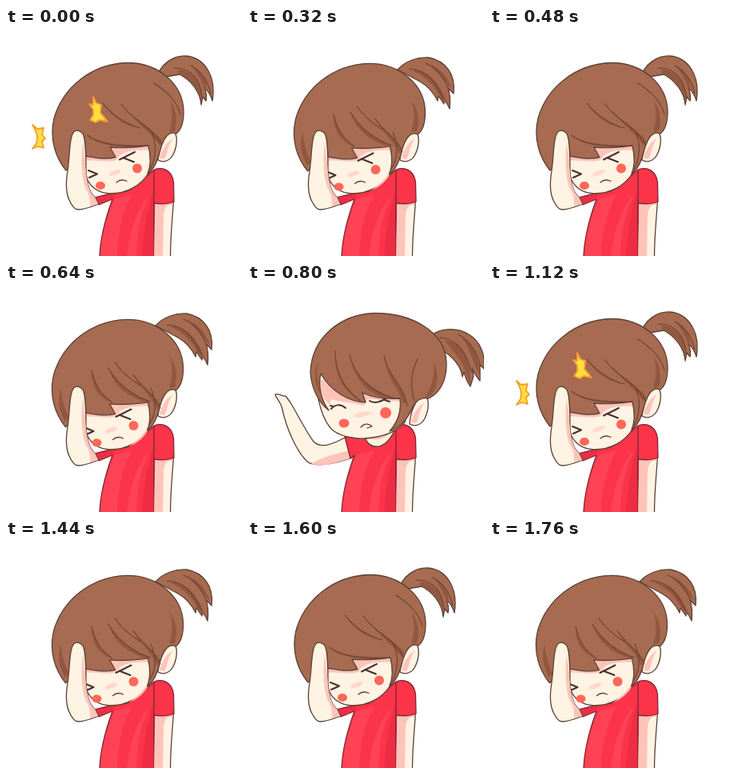
These frames come from a looping animation (295 by 285 pixels, 1920 ms). An HTML page:

```html
<!DOCTYPE html>
<html lang="en">
<head>
<meta charset="utf-8">
<title>Facepalm</title>
<style>
  html, body { margin: 0; width: 100%; height: 100%; overflow: hidden; background: #fff; }
  svg { display: block; width: 295px; height: 285px; }
  path { fill: none; stroke: #5b4036; stroke-width: 1.3; stroke-linejoin: round; stroke-linecap: round; }
  .hair { fill: #a66b50; }
  .dark { fill: #925741; stroke: none; }
  .strand { stroke: #6d4232; stroke-width: 1.1; }
  .skin { fill: #fff3e3; }
  .shade { fill: #ffc4b9; stroke: none; }
  .shirt { fill: #fb3449; stroke: #7b2830; }
  .light { fill: #ff4256; stroke: none; }
  .fold { fill: #ee2d44; stroke: none; }
  .eye { stroke: #49302b; stroke-width: 2; }
  .cheek { fill: #ff6759; }
  .blush { fill: #ffd8c9; }
  .spark { fill: #ffdf40; stroke: #f99b32; stroke-width: 1.8; }
</style>
</head>
<body>
<svg viewBox="0 0 295 285">
  <defs>
    <g id="arm">
      <path class="skin" d="M185 213L184 286H205.500C205.500 260 208 239 209.500 215Z"/>
      <path class="shade" d="M185.500 214L208.500 216L208 221C202 220 198 224 197 234L196 285H185Z"/>
    </g>
    <g id="sleeve">
      <path class="shirt" d="M185 177C199 172 208 181 209.500 193L210 217C201 221 192 220 185 219Z"/>
    </g>
    <g id="folds">
      <path class="light" d="M136 214L158 208C145 230 140 258 139 285H118C119 260 126 234 136 214ZM176 212C162 232 154 257 151 285H163C164 257 168 232 179 212Z"/>
      <path class="fold" d="M184 204C176 230 172 256 170 285H184Z"/>
      <path class="strand" style="stroke:#a5253a" d="M186 194L184.500 285"/>
    </g>
    <g id="ear">
      <path class="skin" d="M190 165C191 150 197 134 207 130C215 128 215 146 209 158C205 166 197 169 190 165Z"/>
      <path class="shade" d="M192 163C195 151 200 143 209 138C201 148 203 156 198 164Z"/>
    </g>
    <g id="palmBody">
      <use href="#arm"/>
      <path class="shirt" d="M111 212C126 208 139 205 151 204C163 198 173 187 184 178L191 178L185 215L184 286H117C118 260 125 236 133 214L116 221Z"/>
      <path class="fold" d="M112 212C121 211 128 208 136 206L133 213L116 220Z"/>
      <use href="#folds"/><use href="#sleeve"/>
    </g>
    <g id="palmFace">
      <use href="#ear"/>
      <path class="skin" d="M92 140L101 188C106 200 115 206 130 207C151 207 169 197 179 180L187 145Z"/>
      <path class="shade" d="M98 156V166C112 164 126 169 138 165C142 155 160 151 180 153L183 146L130 146Z"/>
    </g>
    <path id="palmHair" class="hair" d="M75 178C62 162 54 139 60 113C71 74 107 45 151 43.500C190 43 222 70 222 105C222 119 218 128 213 132C203 128 197 138 193 152C190 165 186 176 177 182C181 173 181 160 178 147C163 149 147 151 130 149L137 161.500C124 165 111 162 98 160Z"/>
    <g id="palmArm">
      <path class="skin" d="M86 129C79 133 80 159 77 179C74 197 75 208 80 217C83 223 86 227 90 227C99 227 108 223 116 220L111 211C104 206 101 192 100 180C100 161 100 139 96 132C93 129 89 127 86 129Z"/>
      <path class="shade" d="M96 143C93 164 95 190 100 201C104 208 106 214 105 223L115 220L111 211C104 206 101 192 100 180Z"/>
    </g>
    <g id="wince">
      <path class="eye" d="M161 155L142 164.500M146 162L160 167.500M103 178L114 182.500L104 187"/>
      <path d="M138 193C142 189.500 147 189.500 151 191.500" stroke-width="1.5"/>
      <ellipse class="blush" cx="136" cy="181" rx="8" ry="3" transform="rotate(-20 136 181)"/>
      <ellipse class="cheek" cx="118" cy="197" rx="6" ry="5"/>
      <circle class="cheek" cx="164" cy="175.500" r="6"/>
    </g>
  </defs>

  <g id="lean">
    <path class="hair" d="M188 63C193 45 209 34 225 35C249 37 263 61 258 91C256 84 253 79 248 75C251 82 251 87 250 91L246 86L244 96C243 80 231 65 217 58Z"/>
    <path class="dark" d="M215 52C234 54 245 66 245 92C241 75 230 63 215 56ZM232 47C246 55 252 65 250 81C246 68 240 58 232 47Z"/>
    <path class="strand" d="M210 50C232 50 243 64 245 86M231 47C244 54 252 65 256 82"/>
    <use href="#palmBody"/><use href="#palmFace"/><use href="#wince"/><use href="#palmHair"/>
    <path class="dark" d="M121 94C134 108 149 119 168 125C153 124 134 114 121 94ZM144 94C156 112 176 119 195 140L193 148C184 133 163 119 144 94ZM102 133C117 145 145 147 176 146C150 151 121 148 102 133ZM205 91C213 102 215 115 211 129L204 130C208 117 209 105 205 91Z"/>
    <path class="strand" d="M121 94C133 109 148 120 168 125M144 95C158 116 181 122 194 145M102 134C117 147 145 149 176 147M182 130C188 144 188 161 180 177M185 69C202 80 213 91 218 108"/>
    <use href="#palmArm"/>
  </g>

  <g id="bob">
    <path class="hair" d="M187 52C197 41 212 36 226 37C247 41 260 58 257 82L250 75C253 83 253 92 252 101L245 87L245 95L238 85L237 91C231 79 224 72 215 67Z"/>
    <path class="dark" d="M207 52C229 55 240 70 250 96C241 90 236 78 229 70C222 62 214 57 207 54ZM226 45C240 50 249 60 255 76C245 67 238 56 226 45Z"/>
    <path class="strand" d="M201 51C225 52 235 69 244 88M222 44C238 51 244 60 251 77"/>
    <use href="#palmBody"/><use href="#palmFace"/>
    <path class="shade" d="M154 203C166 198 173 191 178 182L179 177C173 187 164 196 154 203Z"/>
    <use href="#wince" transform="translate(-4.500 1.500)"/>
    <use href="#palmHair" transform="translate(-.500 .800)"/>
    <path class="dark" d="M107 108C110 125 118 138 133 149C116 142 106 128 107 108ZM128 105C138 124 157 137 180 147L172 147C151 140 134 126 128 105ZM159 113C168 130 186 138 193 154L189 157C182 140 168 132 159 113ZM205 91C213 102 215 115 211 129L204 130C208 117 209 105 205 91ZM68 130C70 145 74 158 79 168L74 172C67 160 64 146 68 130Z"/>
    <path class="strand" d="M136 98C145 111 155 119 168 127M128 105C138 124 158 139 180 147M159 113C170 131 187 138 193 155M107 108C111 127 119 139 133 148M181 130C188 146 188 163 179 176"/>
    <use href="#palmArm"/>
  </g>

  <g id="raise">
    <path class="hair" d="M231 63C242 55 262 54 276 63C290 71 297 88 295 106L290 101L290 121C285 115 282 110 280 105L282 115L278 128C273 122 272 117 270 110L268 116C266 102 256 91 242 82Z"/>
    <path class="dark" d="M246 70C265 74 278 88 278 124C273 117 272 105 265 95C258 85 251 78 246 70ZM266 65C281 75 288 89 289 112C282 102 278 80 266 65Z"/>
    <path class="strand" d="M240 67C262 68 274 88 279 110M263 63C278 72 287 87 290 103"/>
    <use href="#arm"/>
    <path class="skin" d="M123 191C105 201 91 206 82 197C73 185 63 165 53 148L47 140C43 141 38 136 34 138C35 143 41 147 43 157C48 180 60 208 73 221C82 230 104 226 131 217Z"/>
    <path class="shade" d="M79 225C92 216 108 213 127 208L131 217C106 225 92 229 79 225Z"/>
    <path class="shirt" d="M121 191C145 193 168 187 185 177L191 178L185 215L184 286H117C118 260 125 236 133 214L128 218Z"/>
    <use href="#folds"/><use href="#sleeve"/>
    <path class="skin" d="M145 188C148 201 155 204 164 203C174 200 181 190 186 176Z"/>
    <path class="shade" d="M147 191C160 199 175 193 185 178L184 174L150 186Z"/>
    <use href="#ear" transform="translate(12 10)"/>
    <path class="skin" d="M85 112C85 145 94 172 106 183C118 192 140 195 155 192C172 190 186 184 196 173L204 140L160 112Z"/>
    <path class="shade" d="M88 120C90 134 95 145 102 151L104 144C118 148 131 148 145 152L149 144C162 144 176 146 190 147L194 140L151 120Z"/>
    <path class="eye" d="M104 156C109 150 116 150 122 155M106 153L103 152M152 146C158 150 168 147 173 142M171 145L177 147"/>
    <path d="M141 179C144 175 150 173 155 178L149 180" stroke-width="1.5"/>
    <ellipse class="blush" cx="143" cy="163" rx="11" ry="3" transform="rotate(-12 143 163)"/>
    <ellipse class="cheek" cx="120" cy="174" rx="6.500" ry="5.500"/>
    <circle class="cheek" cx="172" cy="161" r="7"/>
    <path class="hair" d="M101 158C88 148 79 130 78 110C80 66 116 38 158 36.500C204 36 246 59 248 97C249 118 241 136 226 143C216 141 210 145 206 154C200 168 191 179 177 184C186 174 192 160 190 143C176 144 158 143 143 136L147 148C126 147 104 135 91 112C87 128 92 146 101 158Z"/>
    <path class="dark" d="M109 84C108 109 121 132 143 147C121 137 107 115 109 84ZM127 88C132 114 154 133 183 143L176 143C152 140 132 120 127 88ZM170 89C174 115 192 124 199 148L194 149C188 130 172 116 170 89ZM232 98C239 110 238 126 229 139L221 142C230 128 234 114 232 98ZM88 96C85 109 86 124 92 140C83 128 81 110 88 96Z"/>
    <path class="strand" d="M109 84C109 113 121 132 140 146M127 88C133 116 155 135 183 143M170 89C175 116 194 125 199 152M212 94C203 111 203 130 208 146"/>
  </g>

  <g id="sparks">
    <path class="spark" d="M109 86L113 94L119 96L118 106L127 117L117 115L112 118L105 115L109 109L109 102L104 95L109 96Z"/>
    <path class="spark" d="M33 121L39 126L47 125L45 133L49 138L45 142L47 150L40 148L33 151L38 144C41 137 38 129 33 121Z"/>
  </g>
</svg>
<script>
  const STEP = 160;
  const poses = ["lean", "bob", "raise"];
  const order = [0, 0, 1, 0, 1, 2, 2, 0, 0, 1, 0, 1];
  const show = (id, on) => document.getElementById(id).style.display = on ? "" : "none";

  function draw(now) {
    const step = Math.floor(now / STEP) % order.length;
    poses.forEach((id, i) => show(id, i === order[step]));
    show("sparks", step === 0 || step === 7);
  }

  const start = performance.now();
  function tick() {
    draw(performance.now() - start);
    requestAnimationFrame(tick);
  }
  tick();
</script>
</body>
</html>
```
